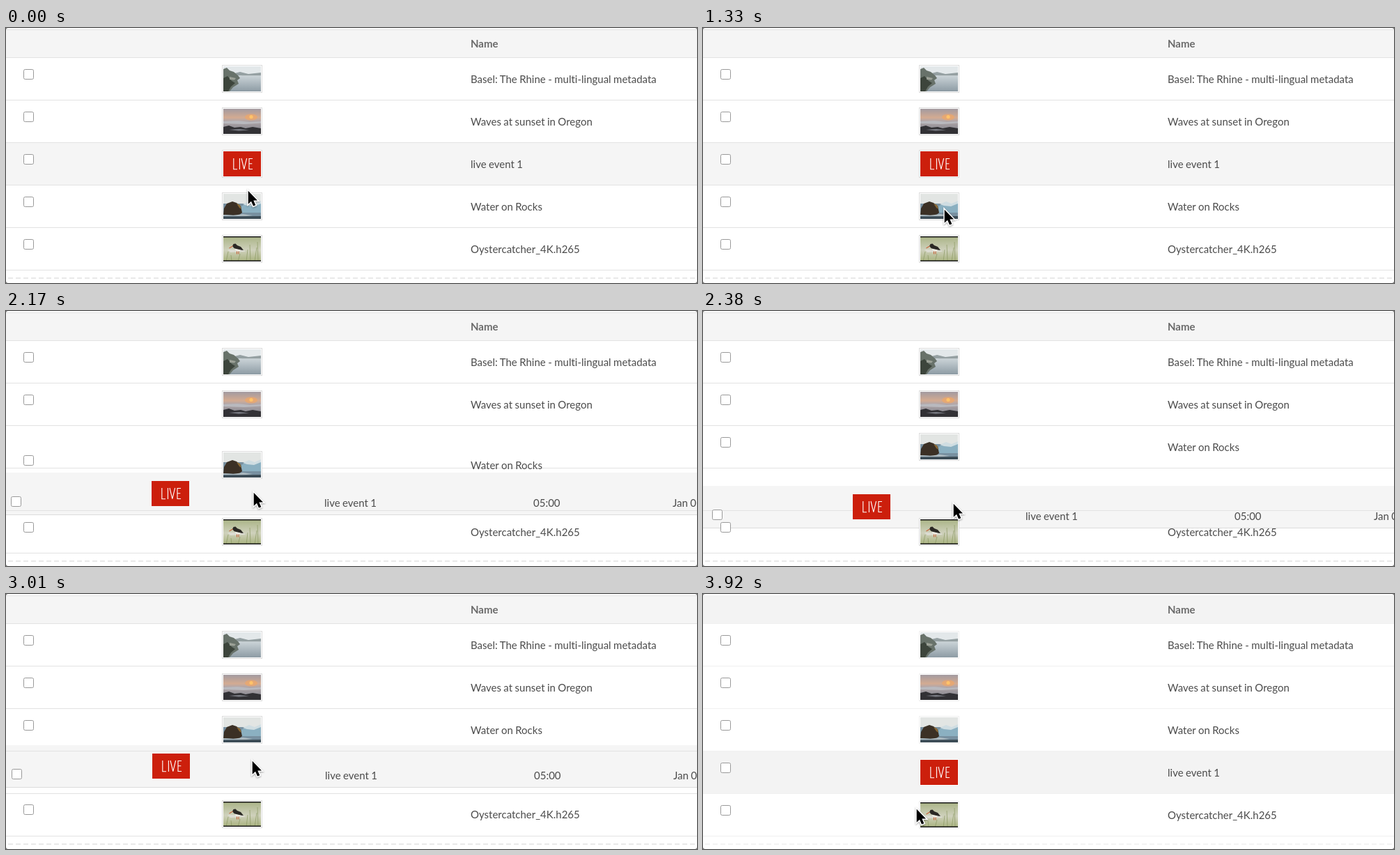
Animation of 992x366 px, one loop 3.99 s. Source, as an HTML page:

```html
<!DOCTYPE html>
<html lang="en">
<head>
<meta charset="utf-8">
<title>Sortable media list</title>
<style>
  html, body { margin: 0; width: 100%; height: 100%; overflow: hidden; background: #666; }
  svg { display: block; width: 992px; height: 366px; }
  text { font: 15px Lato, sans-serif; font-variant-ligatures: none; word-spacing: -.4px; fill: #4c4c4c; }
  .head { font-weight: 700; fill: #6a6a6a; }
  .tint { fill: #f5f5f5; }
  .lines { fill: none; stroke: #e2e2e2; }
  .frame { fill: #fff; stroke: #dcdcdc; }
  .check { fill: #fff; stroke: #999; }
  .faded .tint { fill: #f3f3f3; }
  .faded .lines, .faded .frame { stroke: #f0f0f0; }
  .cursor { stroke: #fff; stroke-width: 3; paint-order: stroke; filter: drop-shadow(0 1px 1px rgba(0, 0, 0, .35)); }
</style>
</head>
<body>
<svg id="stage" viewBox="0 0 992 366">
  <defs>
    <linearGradient id="dusk" x2="0" y2="1">
      <stop offset="0" stop-color="#a29aa0"/>
      <stop offset=".35" stop-color="#d3ab92"/>
      <stop offset=".48" stop-color="#b3a7a8"/>
      <stop offset="1" stop-color="#777d89"/>
    </linearGradient>
    <linearGradient id="stream" x2="0" y2="1">
      <stop offset="0" stop-color="#cfd7db"/>
      <stop offset="1" stop-color="#8d9ba4"/>
    </linearGradient>
    <linearGradient id="meadow" x2="0" y2="1">
      <stop offset="0" stop-color="#a9b385"/>
      <stop offset=".55" stop-color="#cfd1bc"/>
      <stop offset="1" stop-color="#a8b27e"/>
    </linearGradient>
    <clipPath id="crop"><path d="M0 0H54V36H0Z"/></clipPath>

    <g id="river">
      <path fill="#e3e8ea" d="M0 0H54V13H0Z"/>
      <path fill="url(#stream)" d="M0 12H54V36H0Z"/>
      <path fill="#95a0a2" d="M16 10L24 8 36 11 54 9V13H16Z"/>
      <path fill="#c3cbce" d="M26 13H54V14.2H26Z"/>
      <path fill="#68726a" d="M0 4L5 2 9 6 15 8 21 13 24 17 20 20 22 25 14 30 9 36H0Z"/>
      <path fill="#3d453c" d="M0 17L6 14 12 21 17 24 11 29 7 36H0Z"/>
      <path fill="#9ca197" d="M9 15L18 17 16 19.5 9 19Z"/>
    </g>
    <g id="sunset">
      <path fill="url(#dusk)" d="M0 0H54V36H0Z"/>
      <ellipse cx="40" cy="12" rx="9" ry="4.5" fill="#efa766" opacity=".7"/>
      <circle cx="40" cy="11.5" r="2.6" fill="#ffc36a"/>
      <path fill="#b9b9be" d="M0 18L20 17 38 19 54 18V20.5L30 22 0 21Z"/>
      <path fill="#323135" d="M0 26L8 24 16 27 25 26 32 28 42 26 54 28V36H0Z"/>
      <path fill="#7d7f87" d="M8 30L23 29 37 30.5 22 31.5Z"/>
    </g>
    <g id="live">
      <path fill="#cc1f0c" d="M0 0H54V36H0Z"/>
      <path fill="none" stroke="#fff" stroke-width="1.1"
        d="M14.8 10V25.7H20M23.4 10V26M26 10L29.8 25.6 33.6 10M42 10.5H37V25.5H42M37 17.8H41.3"/>
    </g>
    <g id="rocks">
      <path fill="#e2e5e3" d="M0 0H54V16H0Z"/>
      <path fill="#7890a0" d="M0 14H54V36H0Z"/>
      <path fill="#8bb0c1" d="M26 18L36 12 46 15 54 12V27H26Z"/>
      <path fill="#cfdde2" d="M28 15L37 11 45 14 54 10V14L44 18 34 17Z"/>
      <path fill="#3b3025" d="M1 21L5 14 13 11 19 13 25 18 27 27 22 31 0 30Z"/>
      <path fill="#8c6a35" d="M19 14L24 16 26 22 23 20Z"/>
      <path fill="#aebbc1" d="M0 30L14 31 28 29 42 31 28 32.5 0 32Z"/>
      <path fill="#3c4c56" d="M0 32.5L54 32V36H0Z"/>
    </g>
    <g id="bird">
      <path fill="url(#meadow)" d="M0 0H54V36H0Z"/>
      <path stroke="#8a9962" stroke-width=".7"
        d="M4 36L7 22M12 36L11 27M21 36L24 25M33 36L35 19M39 36L38 12M45 36L48 16M50 36L49 8"/>
      <path fill="#dcdcd2" d="M6 19H28L32 22 10 23Z"/>
      <path fill="#2a2824" d="M13 14L14.5 11 17.5 10.5 20 13 25 15 29 20 24 19.5 18 18.5 15 16.5Z"/>
      <path fill="#ecebe2" d="M16.5 17.5L25 19.5 22 22 18 21Z"/>
      <path stroke="#c8643c" stroke-width="1.1" d="M13.5 14L8.5 17M19.5 21.5V25.5M22 21.5V25.5"/>
      <path fill="#161616" d="M0 0H54V1.6H0ZM0 34.4H54V36H0Z"/>
    </g>
  </defs>

  <rect width="992" height="366" rx="3" fill="#fff"/>
  <path class="tint" d="M0 3H992V42H0Z"/>
  <rect id="mark" class="tint" y="165" width="992" height="60"/>
  <g id="band">
    <rect class="tint" width="992" height="60"/>
    <path stroke="#dcdcdc" d="M0 60.5H992"/>
  </g>
  <path class="lines" d="M0 2.5H992M0 42.5H992M0 103.5H992M0 164.5H992M0 225.5H992M0 286.5H992M0 347.5H992"/>
  <path class="lines" stroke-width="1.5" stroke-dasharray="7 4" d="M3 359H989"/>
  <text class="head" x="667" y="28">Name</text>
  <g id="rows"></g>
  <g id="helper">
    <rect class="check" x="-201.5" y="34.5" width="14" height="14" rx="2"/>
    <use href="#live" y="12"/>
    <text x="248" y="49">live event 1</text>
    <text x="548" y="49">05:00</text>
    <text x="748" y="49">Jan 01, 1970</text>
  </g>
  <path id="cursor" class="cursor" d="M.7 .7V19.7L5 15.8 8 22.6 11.3 21.2 8.3 14.4H14Z"/>
</svg>

<script>
  const LOOP = 3990, STEP = 70, PITCH = 61, TOP = 42;
  const GRAB = 1890, DROP = 3500, FADE = 3780;
  const $ = id => document.getElementById(id);

  const items = [
    ['river', 'Basel: The Rhine - multi-lingual metadata'],
    ['sunset', 'Waves at sunset in Oregon'],
    ['live', 'live event 1'],
    ['rocks', 'Water on Rocks'],
    ['bird', 'Oystercatcher_4K.h265']
  ];

  $('rows').innerHTML = items.map(([art, name]) => `
    <g>
      <rect class="check" x="25.5" y="17.5" width="14" height="14" rx="2"/>
      <rect class="frame" x="310.5" y="11.5" width="57" height="39"/>
      <g transform="translate(312 13)"><use href="#${art}" clip-path="url(#crop)"/></g>
      <text x="667" y="37">${name}</text>
    </g>`).join('');
  const rows = [...$('rows').children];

  // Each key: time, x, y
  const pointer = [
    [0, 347, 233], [560, 347, 256], [770, 346, 260], [1330, 346, 260],
    [1820, 349, 187], [1960, 350, 186], [2170, 355, 260], [2380, 359, 276],
    [2520, 361, 281], [2660, 361, 280], [3010, 353, 239], [3200, 352, 238],
    [3710, 352, 238], [3920, 306, 308]
  ];
  const drag = [
    [1890, 205, 164], [1960, 206, 164], [2100, 207, 196], [2170, 209, 232],
    [2380, 215, 251], [2520, 217, 260], [2660, 217, 258], [2800, 215, 250],
    [3010, 210, 217], [3200, 209, 216], [3500, 205, 225]
  ];

  const clamp = v => Math.min(1, Math.max(0, v));

  // Monotone cubic through the keys, so rests stay still and turns never overshoot
  function sample(keys, t, axis) {
    const last = keys.length - 1;
    if (t <= keys[0][0]) return keys[0][axis];
    if (t >= keys[last][0]) return keys[last][axis];
    const slope = i => (keys[i + 1][axis] - keys[i][axis]) / (keys[i + 1][0] - keys[i][0]);
    const tangent = i => {
      if (i === 0 || i === last) return 0;
      const a = slope(i - 1), b = slope(i);
      return a * b > 0 ? 2 * a * b / (a + b) : 0;
    };
    const i = keys.findIndex(k => k[0] > t) - 1;
    const span = keys[i + 1][0] - keys[i][0];
    const p = (t - keys[i][0]) / span, q = 1 - p;
    return q * q * (1 + 2 * p) * keys[i][axis] + p * p * (3 - 2 * p) * keys[i + 1][axis]
      + p * q * span * (q * tangent(i) - p * tangent(i + 1));
  }

  const slide = (t, start) => 1 - (1 - clamp((t - start) / 300)) ** 3;

  function place(el, x, y) {
    el.setAttribute('transform', `translate(${x} ${y})`);
  }

  function show(el, on) {
    el.style.display = on ? '' : 'none';
  }

  function render(t) {
    const held = t >= GRAB && t < DROP;
    const shift = [0, 0, t >= DROP ? 1 : 0, -slide(t, 2096), slide(t, 2791) - slide(t, 2489)];
    rows.forEach((row, i) => place(row, 0, Math.round(TOP + PITCH * (i + shift[i]))));
    show(rows[2], !held);
    show($('mark'), !held);
    $('mark').setAttribute('y', t >= DROP ? 226 : 165);

    const x = Math.round(sample(drag, t, 1)), y = Math.round(sample(drag, t, 2));
    place($('band'), 0, y);
    place($('helper'), x, y);
    show($('band'), held);
    show($('helper'), held);

    place($('cursor'), sample(pointer, t, 1), sample(pointer, t, 2));
    $('stage').classList.toggle('faded', t >= FADE);
  }

  const start = performance.now();
  function tick() {
    const t = (performance.now() - start) % LOOP;
    render(Math.floor(t / STEP) * STEP);
    requestAnimationFrame(tick);
  }
  tick();
</script>
</body>
</html>
```
